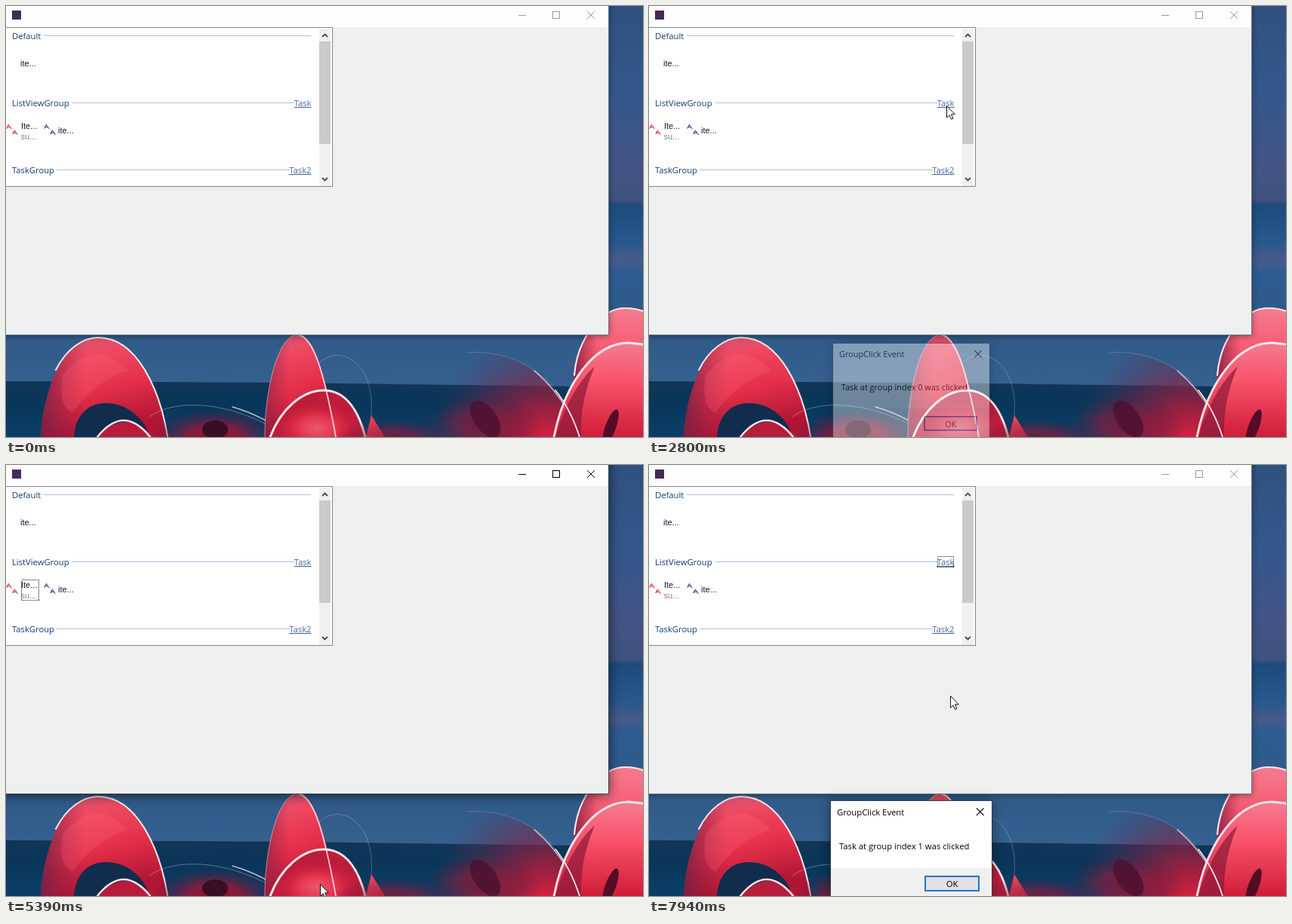
An HTML page for the animation above (8000 ms loop, 844x572 px).

```html
<!DOCTYPE html>
<html lang="en">
<head>
<meta charset="utf-8">
<title>Group task links</title>
<style>
html, body { margin: 0; width: 100%; height: 100%; overflow: hidden; background: #34608f; }
svg { display: block; width: 844px; height: 572px; }
text { font: 11.25px "Open Sans", "Noto Sans", sans-serif; white-space: pre; }
.item { font: 11px "Liberation Sans", Arial, sans-serif; fill: #14143c; }
.sub { fill: #85808a; }
.head { fill: #103d72; }
.link { fill: #4a6a94; text-anchor: end; text-decoration: underline; }
.rule { stroke: #b1bce0; }
.hover .head { fill: #003399; }
.hover .rule { stroke: #8db4e4; }
.row { fill: #e5f3ff; visibility: hidden; }
.hover .row { visibility: visible; }
.dots { fill: none; stroke: #111; stroke-dasharray: 1 1; }
.white { fill: none; stroke: #f8e6ea; stroke-linecap: round; }
.crisp { shape-rendering: crispEdges; }
</style>
</head>
<body>
<svg viewBox="0 0 844 572" xmlns="http://www.w3.org/2000/svg">
<defs>
  <linearGradient id="sky" x2="0" y2="1">
    <stop offset="0" stop-color="#30517f"/><stop offset=".2" stop-color="#33588b"/>
    <stop offset=".36" stop-color="#435485"/><stop offset=".45" stop-color="#40537f"/>
    <stop offset=".462" stop-color="#1d4b7d"/><stop offset=".55" stop-color="#29588c"/>
    <stop offset=".59" stop-color="#475a8a"/><stop offset=".62" stop-color="#2d5c90"/>
    <stop offset=".76" stop-color="#305a88"/><stop offset="1" stop-color="#3a6796"/>
  </linearGradient>
  <linearGradient id="sea" x2="0" y2="1">
    <stop offset="0" stop-color="#123557"/><stop offset=".4" stop-color="#083659"/><stop offset="1" stop-color="#0b3f68"/>
  </linearGradient>
  <linearGradient id="petal" x2=".3" y2="1">
    <stop offset="0" stop-color="#c25a7c"/><stop offset=".25" stop-color="#ee4a63"/>
    <stop offset=".6" stop-color="#e5304b"/><stop offset="1" stop-color="#b01634"/>
  </linearGradient>
  <linearGradient id="blush" x2="0" y2="1">
    <stop offset="0" stop-color="#f57c90"/><stop offset=".4" stop-color="#f8536b"/><stop offset="1" stop-color="#d01c3a"/>
  </linearGradient>
  <linearGradient id="side">
    <stop offset="0" stop-color="#6a2046" stop-opacity=".8"/><stop offset=".35" stop-color="#8d1738" stop-opacity="0"/>
  </linearGradient>
  <radialGradient id="ember">
    <stop offset="0" stop-color="#8c1230"/><stop offset=".4" stop-color="#981735" stop-opacity=".85"/>
    <stop offset="1" stop-color="#4a1f45" stop-opacity="0"/>
  </radialGradient>
  <radialGradient id="glow">
    <stop offset="0" stop-color="#f4687c"/><stop offset=".45" stop-color="#ef3a54"/><stop offset="1" stop-color="#d51836" stop-opacity="0"/>
  </radialGradient>
  <radialGradient id="wing" gradientUnits="userSpaceOnUse" cx="716" cy="578" r="150">
    <stop offset="0" stop-color="#e0203f"/><stop offset=".3" stop-color="#b01c3b" stop-opacity=".85"/>
    <stop offset=".65" stop-color="#7a2448" stop-opacity=".45"/><stop offset="1" stop-color="#5a335f" stop-opacity="0"/>
  </radialGradient>
  <filter id="soft" x="-20%" y="-20%" width="140%" height="140%"><feGaussianBlur stdDeviation="4"/></filter>
  <filter id="wide" x="-20%" y="-20%" width="140%" height="140%"><feGaussianBlur stdDeviation="8"/></filter>
  <g id="letters" fill="none" stroke-width="1">
    <path id="letter" d="M1 6.5L3.5 1.5L7.5 7.5M1 6.5L1.8 4.5L6 5.2M3.5 1.5L1.8 4.5"/>
    <use href="#letter" x="8" y="7.5"/>
  </g>
</defs>

<g id="wallpaper">
  <rect width="844" height="572" fill="url(#sky)"/>
  <path d="M0 498L380 500L844 506V572H0Z" fill="url(#sea)"/>
  <path d="M46 572C48 520 72 440 122 440C174 440 204 510 214 572Z" fill="url(#petal)"/>
  <path d="M46 572C48 520 72 440 122 440C174 440 204 510 214 572Z" fill="url(#side)"/>
  <path d="M75 490Q118 438 162 484Q120 496 88 540Q68 530 75 490Z" fill="#ff6478" opacity=".25"/>
  <path d="M90 572C92 540 112 526 134 527C164 528 184 550 191 572Z" fill="#122c4d"/>
  <path class="white" d="M66 483C80 455 102 440 122 440C174 440 204 510 214 571" stroke-width="2"/>
  <path d="M122 572Q157 532 196 572Z" fill="#b81c3b"/>
  <path class="white" d="M121 572Q156 528 191 572" stroke-width="2.4"/>

  <ellipse cx="276" cy="572" rx="84" ry="38" fill="url(#ember)"/>
  <ellipse cx="277" cy="562" rx="17" ry="12" fill="#3a0d26"/>
  <path class="white" d="M190 545C225 520 300 523 374 572" opacity=".35"/>
  <path class="white" d="M300 532Q344 545 376 572" stroke-width="1.5" opacity=".75"/>

  <path d="M343 572C342 520 358 437 386 436C410 437 422 490 440 572Z" fill="url(#petal)"/>
  <path d="M343 572C342 520 358 437 386 436C410 437 422 490 440 572Z" fill="url(#side)" opacity=".7"/>
  <path class="white" d="M343 572C342 520 358 437 386 436" opacity=".5"/>
  <path d="M350 572C364 535 392 510 422 510C452 511 468 540 476 572Z" fill="#bd1d3b"/>
  <ellipse cx="412" cy="560" rx="56" ry="34" fill="url(#glow)" opacity=".8"/>
  <path class="white" d="M350 572C364 535 392 510 422 510C452 511 468 540 476 572" stroke-width="3"/>
  <path class="white" d="M386 436C408 438 422 490 437 572" stroke-width="1.8" opacity=".85"/>
  <path class="white" d="M415 474C440 448 490 470 484 544" stroke="#a8b6d6" opacity=".25"/>

  <path d="M484 543L502 572H477Z" fill="#ec445b"/>
  <ellipse cx="515" cy="576" rx="80" ry="30" fill="url(#ember)" opacity=".7"/>
  <path d="M560 572V470Q645 440 708 490Q746 528 758 572Z" fill="url(#wing)"/>
  <ellipse cx="630" cy="556" rx="80" ry="42" fill="url(#ember)" opacity=".6"/>
  <ellipse cx="635" cy="548" rx="15" ry="28" transform="rotate(-35 635 548)" fill="#4a1030" opacity=".8"/>
  <path class="white" d="M610 460C662 456 706 480 728 510" opacity=".2"/>
  <path class="white" d="M700 484Q742 520 760 572" stroke-width="1.5" opacity=".75"/>

  <path d="M752 500C756 440 790 400 820 400Q834 400 844 405V572H752Z" fill="url(#blush)"/>
  <path d="M752 500C756 440 790 400 820 400Q834 400 844 405V572H752Z" fill="url(#side)"/>
  <path class="white" d="M753 490C757 440 790 400 820 401Q834 401 844 405" stroke-width="2.2"/>
  <path d="M726 572C740 500 780 447 825 447L844 449V572Z" fill="url(#blush)"/>
  <path d="M728 572Q746 510 780 478Q760 525 762 572Z" fill="#8a1a3a" opacity=".7"/>
  <ellipse cx="801" cy="559" rx="7" ry="25" transform="rotate(20 801 559)" fill="#540c25"/>
  <path class="white" d="M726 572C740 500 780 447 825 447L844 449" stroke-width="2.8"/>
  <path class="white" d="M728 510Q748 535 760 572" stroke-width="1.8"/>
</g>

<rect id="shadow" x="-30" y="-30" width="829" height="468" fill="#000"/>
<g id="window">
  <rect class="crisp" width="798" height="436" fill="#eef0ef"/>
  <rect class="crisp" width="798" height="28" fill="#fefefe"/>
  <path id="edge" class="crisp" d="M0 436.5H798.5V0" fill="none"/>
  <rect x="8" y="6" width="12" height="12" fill="#432c58"/>
  <g id="caption" fill="none">
    <path class="crisp" d="M679 12.5H689M724.5 7.5H733.5V16.5H724.5Z"/>
    <path d="M770 7L780 17M780 7L770 17"/>
  </g>
  <rect class="crisp" x="-.5" y="28.5" width="433" height="211" fill="#fff" stroke="#838399"/>
  <g id="groups"></g>
  <text class="item" x="19" y="80">ite...</text>
  <use href="#letters" x="0" y="156" stroke="#e3203c"/>
  <text class="item" x="20" y="163">Ite...</text>
  <text class="item sub" x="19.5" y="177">su...</text>
  <use href="#letters" x="50" y="156" stroke="#26407c"/>
  <text class="item" x="69" y="169">ite...</text>
  <rect id="itemFocus" class="dots crisp" x="20.5" y="152.5" width="23" height="27"/>
  <rect id="linkFocus" class="dots crisp" x="382.5" y="121.5" width="21" height="14"/>
  <rect class="crisp" x="415" y="30" width="15" height="209" fill="#f0f0f0"/>
  <rect class="crisp" x="415" y="47" width="15" height="136" fill="#cacaca"/>
  <path d="M419 41L422.5 37.5L426 41M419 228L422.5 231.5L426 228" fill="none" stroke="#484858" stroke-width="1.8"/>
</g>

<g id="dialog">
  <rect x="241" y="448" width="213" height="132" fill="#000" opacity=".5" filter="url(#wide)"/>
  <rect class="crisp" x="240.5" y="445.5" width="214" height="134" fill="#fff" stroke="#33435a"/>
  <rect class="crisp" x="241" y="535" width="213" height="44" fill="#f0f0f0"/>
  <text x="249" y="465">GroupClick Event</text>
  <path d="M434 455.5L443.5 465M443.5 455.5L434 465" stroke="#111" stroke-width="1.1"/>
  <text id="message" x="252" y="510"></text>
  <rect id="button" class="crisp"/>
  <text x="401.5" y="560" text-anchor="middle">OK</text>
</g>

<g id="cursor" fill="#fff" stroke="#111">
  <path id="arrow" d="M.5 .5V16.2L4.1 12.8L6.5 18.4L8.9 17.3L6.5 11.8H11.3Z"/>
  <path id="hand" d="M-1.5 13V2a1.5 1.5 0 0 1 3 0V8q0-1.2 1.5-1.2t1.5 1.5q0-.9 1.5-.9t1.5 1.4q.2-.6 1.4-.5t1.4 1.6V14.5q0 2.5-2 5V22H.5V20q-1-2-3-4l-2.5-3.6q-.8-1.5.5-2t3 2.6Z"/>
  <circle id="ring" r="9" fill="none" stroke="#2d8fd8" stroke-width="4"/>
</g>
</svg>

<script>
const LOOP = 8000;
const $ = id => document.getElementById(id);
const set = (id, attrs) => Object.entries(attrs).forEach(([k, v]) => $(id).setAttribute(k, v));
const show = (id, on) => set(id, { visibility: on ? "visible" : "hidden" });
const within = (t, from, to) => t >= from && t < to;

const groups = [
  { name: "Default", y: 40, left: 50, right: 404, link: "" },
  { name: "ListViewGroup", y: 129, left: 88, right: 382, link: "Task", hover: [1410, 2720] },
  { name: "TaskGroup", y: 218, left: 67, right: 376, link: "Task2", hover: [5800, 7010] }
];
$("groups").innerHTML = groups.map((g, i) => `<g id="group${i}">
  <rect class="row crisp" y="${g.y - 10}" width="414" height="20"/>
  <text class="head" x="8" y="${g.y + 4}">${g.name}</text>
  <path class="rule crisp" d="M${g.left} ${g.y - .5}H${g.right}"/>
  <text class="link" x="404.5" y="${g.y + 4}">${g.link}</text></g>`).join("");

// Each pointer move: start, end, number of steps, target, optional bend point
const start = [849, 292];
const moves = [
  [610, 1180, 8, [383, 147]],
  [1340, 1550, 4, [392, 138]],
  [1720, 1720, 1, [393, 139]],
  [1870, 1950, 2, [394, 132]],
  [3650, 4440, 11, [416, 556], [503, 370]],
  [5460, 5840, 6, [409, 223]],
  [5940, 6230, 5, [397, 217]],
  [7870, 7940, 2, [399, 306]]
];

function pointerAt(t) {
  let pos = start;
  for (const [from, to, steps, target, bend] of moves) {
    if (t < from) break;
    const step = steps > 1 ? Math.floor((t - from) / (to - from) * (steps - 1) + 1e-6) : 0;
    const p = Math.min(1, (step + 1) / steps), q = 1 - p;
    pos = pos.map((a, i) => {
      const mid = bend ? bend[i] : (a + target[i]) / 2;
      return Math.round(q * q * a + 2 * p * q * mid + p * p * target[i]);
    });
  }
  return pos;
}

const stepped = (t, from, values) =>
  values[Math.min(values.length - 1, Math.floor((t - from) / 80))];

function dialogOpacity(t) {
  const opening = [0, .4, .8, .95, 1];
  if (t >= 7010) return stepped(t, 7010, opening);
  if (t >= 5150) return stepped(t, 5150, [.7, .3, .08, 0]);
  return t >= 2720 ? stepped(t, 2720, opening) : 0;
}

function drawDialog(t) {
  const opacity = dialogOpacity(t);
  const scale = .95 + .05 * opacity;
  set("dialog", {
    opacity,
    visibility: opacity ? "visible" : "hidden",
    transform: `translate(347.5 512) scale(${scale}) translate(-347.5 -512)`
  });
  $("message").textContent = `Task at group index ${t < 6000 ? 0 : 1} was clicked`;
  const hot = within(t, 4440, 6000), inset = hot ? .5 : 1;
  const fill = !hot ? "#e1e1e1" : t < 4530 ? "#e2e6ea" : t < 4580 ? "#e4ecf4"
    : t < 5070 ? "#e5f1fb" : "#cce4f7";
  set("button", {
    x: 365 + inset, y: 545 + inset, width: 73 - 2 * inset, height: 21 - 2 * inset,
    fill, stroke: hot ? "#3c7fb1" : "#1878c8", "stroke-width": 2 * inset
  });
}

function drawWindow(t) {
  const active = within(t, 2040, 2720) || within(t, 5150, 7010);
  set("shadow", { filter: `url(#${active ? "wide" : "soft"})`, opacity: active ? .6 : .4 });
  set("edge", { stroke: active ? "#3b4a5a" : "#65788c" });
  set("caption", { stroke: active ? "#000" : "#999" });
  show("itemFocus", active);
  show("linkFocus", t >= 7010);
  groups.forEach((g, i) =>
    $("group" + i).classList.toggle("hover", !!g.hover && within(t, ...g.hover)));
}

function drawCursor(t) {
  const [x, y] = pointerAt(t);
  const busy = within(t, 6460, 6620);
  const hand = !busy && (within(t, 1870, 2720) || within(t, 6010, 7010));
  const shown = t >= 610;
  set("cursor", { transform: `translate(${x} ${y})` });
  show("arrow", shown && !busy && !hand);
  show("hand", shown && hand);
  show("ring", shown && busy);
}

function render(now) {
  const t = now % LOOP;
  drawWindow(t);
  drawDialog(t);
  drawCursor(t);
}

const began = performance.now();
function tick() {
  render(performance.now() - began);
  requestAnimationFrame(tick);
}
tick();
</script>
</body>
</html>
```
